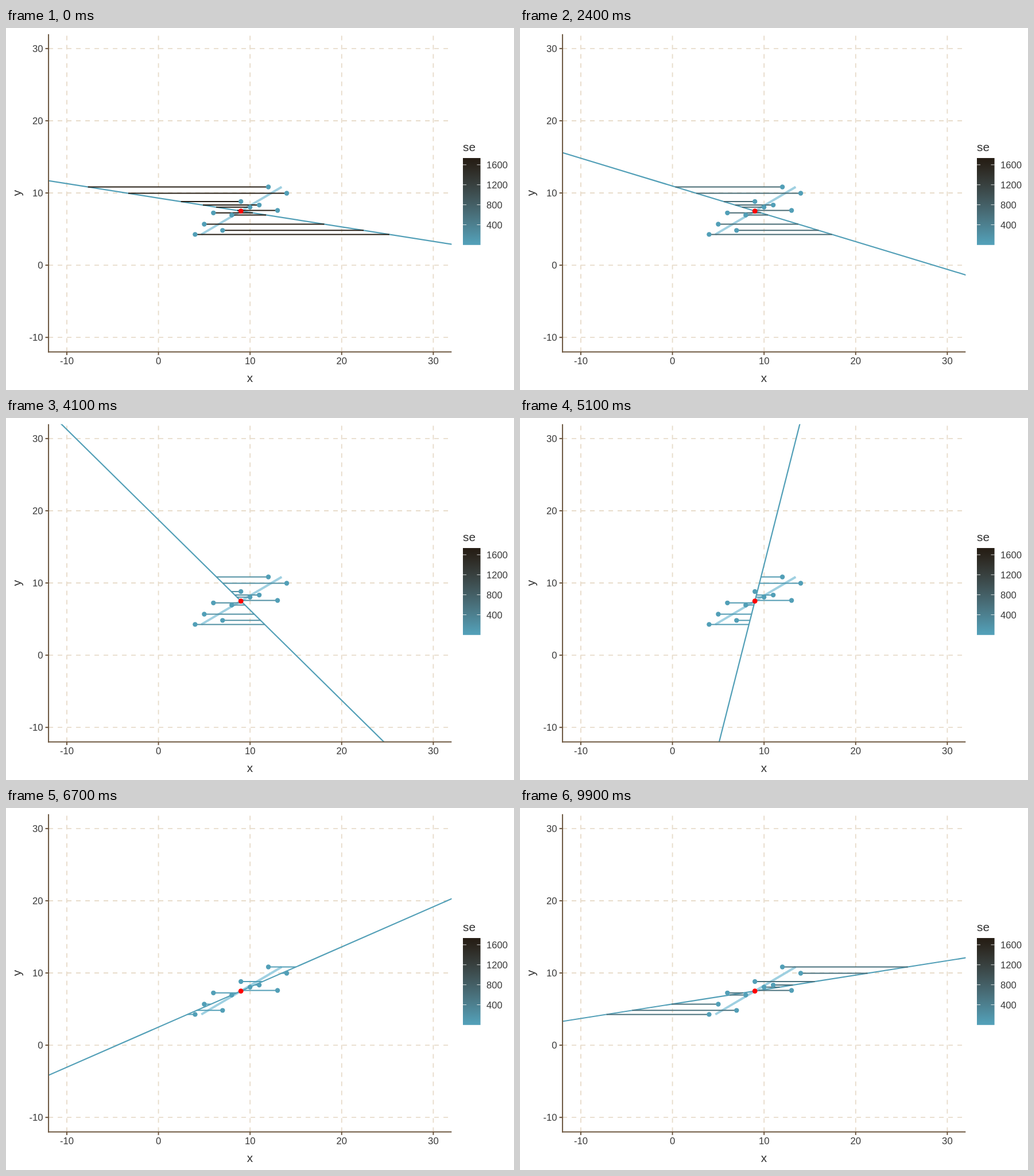
An HTML page for the animation above (10 s loop, 885x632 px).

```html
<!DOCTYPE html>
<html lang="en">
<head>
<meta charset="utf-8">
<title>Rotating regression line</title>
<style>
  html, body { margin: 0; width: 100%; height: 100%; overflow: hidden; background: #fff; }
  svg { display: block; width: 885px; height: 632px; }
  text { font-family: "Liberation Sans", Arial, sans-serif; font-size: 16.7px; fill: #383838; }
  text.title { font-size: 20.8px; fill: #333; }
  .grid { stroke: #e8dccb; stroke-width: 1.9; stroke-dasharray: 8 8; }
  .axis { stroke: #6c563f; stroke-width: 2; }
  .fit { stroke: #9fd0e1; stroke-width: 4; }
  .line { stroke: #529fb7; stroke-width: 2.2; }
  .dot { fill: #529fb7; }
  .mark { stroke: #fff; stroke-width: .8; }
</style>
</head>
<body>
<svg id="plot" viewBox="0 0 885 632">
  <defs>
    <clipPath id="panel"><rect x="74.1" y="10.8" width="702.3" height="554.7"/></clipPath>
    <linearGradient id="ramp" gradientUnits="userSpaceOnUse" x1="0" y1="375.2" x2="0" y2="230.8"/>
  </defs>
</svg>
<script>
const LOOP = 10000, FRAMES = 100, STEPS = 50;
const MEAN = { x: 9, y: 7.5 };
const LOW_SE = 36.7, HIGH_SE = 1692;
const points = [[10, 8.04], [8, 6.95], [13, 7.58], [9, 8.81], [11, 8.33], [14, 9.96],
  [6, 7.24], [4, 4.26], [12, 10.84], [7, 4.82], [5, 5.68]];

const svg = document.getElementById('plot');
const px = x => 265.6 + 15.96 * x;
const py = y => 414.1 - 12.607 * y;
const seColor = p => `color-mix(in lab, #261e15 ${(p * 100).toFixed(2)}%, #529fb7)`;

function set(el, attrs) {
  for (const name in attrs) el.setAttribute(name, attrs[name]);
  return el;
}
function add(tag, attrs, parent = svg) {
  return parent.appendChild(set(document.createElementNS('http://www.w3.org/2000/svg', tag), attrs));
}
function line(x1, y1, x2, y2, cls, parent) {
  return add('line', { x1, y1, x2, y2, class: cls }, parent);
}
function label(str, x, y, anchor, attrs = {}) {
  add('text', { x, y, 'text-anchor': anchor, ...attrs }).textContent = str;
}

const left = px(-12), right = px(32), top_ = py(32), bottom = py(-12);

for (const v of [-10, 0, 10, 20, 30]) {
  if (v < 30 || py(v) > top_) line(left, py(v), right, py(v), 'grid');
  line(px(v), bottom, px(v), top_, 'grid');
}

// Data layers
const panel = add('g', { 'clip-path': 'url(#panel)' });
const fitX = y => MEAN.x + 1.333 * (y - MEAN.y);
line(px(fitX(4.26)), py(4.26), px(fitX(10.84)), py(10.84), 'fit', panel);
const model = line(0, py(-14), 0, py(34), 'line', panel);
const errors = add('g', { 'stroke-width': 2 }, panel);
const segments = points.map(([x, y]) => line(px(x), py(y), 0, py(y), 'error', errors));
for (const [x, y] of points) add('circle', { cx: px(x), cy: py(y), r: 4.2, class: 'dot' }, panel);
add('circle', { cx: px(MEAN.x), cy: py(MEAN.y), r: 4.4, fill: '#f00' }, panel);

// Axes
line(left, bottom + 1, left, top_, 'axis');
line(left - 1, bottom, right, bottom, 'axis');
for (const v of [-10, 0, 10, 20, 30]) {
  line(left - 5.5, py(v), left, py(v), 'axis');
  line(px(v), bottom, px(v), bottom + 5.5, 'axis');
  label(v, 64.5, py(v) + 6, 'end');
  label(v, px(v), 587, 'middle');
}
label('x', 425, 617.5, 'middle', { class: 'title' });
label('y', 0, 0, 'middle', { class: 'title', transform: 'translate(25.5 288) rotate(-90)' });

// Colour bar
const ramp = document.getElementById('ramp');
for (let i = 0; i <= 10; i++) {
  add('stop', { offset: i / 10, style: `stop-color:${seColor(i / 10)}` }, ramp);
}
label('se', 796, 215, 'start', { class: 'title' });
add('rect', { x: 796, y: 227, width: 30.6, height: 151.8, fill: 'url(#ramp)' });
for (const v of [400, 800, 1200, 1600]) {
  const y = 375.2 - 144.4 * (v - LOW_SE) / (HIGH_SE - LOW_SE);
  line(796, y, 802.1, y, 'mark');
  line(820.5, y, 826.6, y, 'mark');
  label(v, 837, y + 6, 'start');
}

// k is the change in x per unit of y
function draw(k) {
  const lineX = y => px(MEAN.x + k * (y - MEAN.y));
  set(model, { x1: lineX(-14), x2: lineX(34) });
  let se = 0;
  points.forEach(([x, y], i) => {
    se += (x - MEAN.x - k * (y - MEAN.y)) ** 2;
    set(segments[i], { x2: lineX(y) });
  });
  const p = (se - LOW_SE) / (HIGH_SE - LOW_SE);
  errors.style.stroke = seColor(Math.min(1, Math.max(0, p)));
}

const start = performance.now();
let shown = -1;
function tick(now) {
  const frame = Math.floor((Math.max(0, now - start) % LOOP) / (LOOP / FRAMES));
  const step = Math.round(frame * STEPS / (FRAMES - 1));
  if (step !== shown) draw(-5 + 0.2 * (shown = step));
  requestAnimationFrame(tick);
}
tick(start);
</script>
</body>
</html>
```
